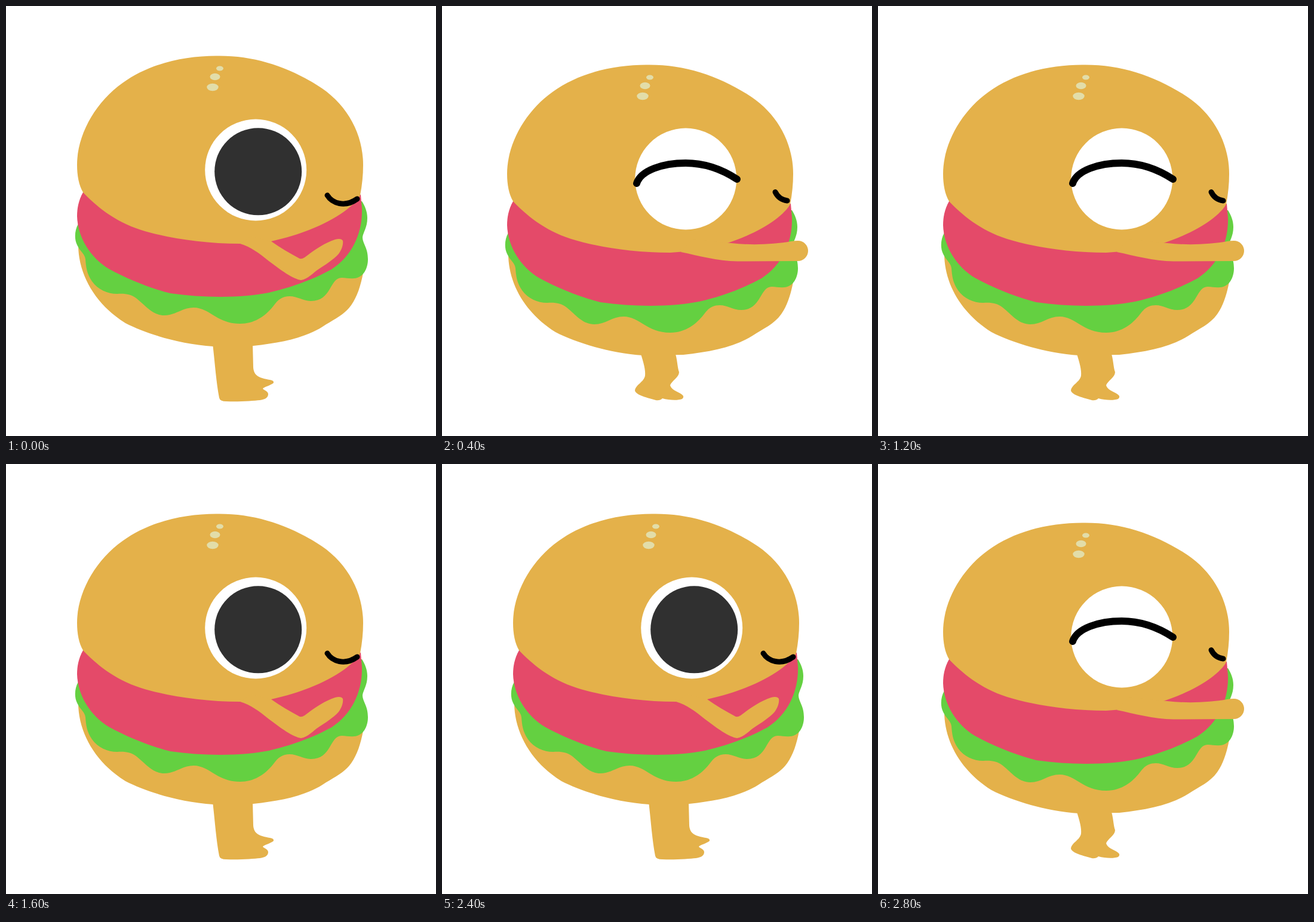
These frames come from a looping animation (720x720 px, 3200 ms). An HTML page:

```html
<!DOCTYPE html>
<html lang="en">
<head>
<meta charset="utf-8">
<title>Hugging burger</title>
<style>
  html, body { margin: 0; width: 100%; height: 100%; overflow: hidden; background: #fff; }
  svg { display: block; width: 100%; height: 100%; }
  .bun { fill: #e4b14a; }
  .lettuce { fill: #64d041; }
  .patty { fill: #e44a69; }
  .seeds { fill: #e2dda9; }
  .line { fill: none; stroke: #000; stroke-width: 9; stroke-linecap: round; }
  .lid { stroke-width: 12; }
</style>
</head>
<body>
<svg viewBox="0 0 720 720">
  <g id="body">
    <path class="bun" d="M121 400C121 450 150 500 200 531C235 549 290 566 347 570L414 569
      C460 564 500 556 530 537C548 525 566 518 578 501C588 487 594 468 598 447L560 400Z"/>
    <path class="lettuce" d="M121 365C115 375 114 390 119 400C124 411 132 415 133 424
      C134 437 135 448 144 461C154 475 170 482 186 482C198 481 209 482 219 490
      C233 501 245 518 265 518C284 518 295 505 314 505C341 505 353 532 392 532
      C419 532 437 516 448 502C456 491 463 486 475 486C488 486 497 494 511 494
      C545 494 542 455 562 455C570 455 575 457 583 456C598 455 606 440 606 424
      C606 404 597 398 597 387C598 379 605 371 605 355C605 344 601 335 596 327L400 340Z"/>
    <path class="patty" d="M129 312C121 326 119 340 119 352C120 388 142 422 172 440
      C205 458 240 472 275 481C330 489 395 489 440 480C475 472 510 460 545 441
      C580 418 597 380 596 340L594 316L400 280Z"/>
    <path class="bun" d="M119 266C119 215 150 161 195 129C240 96 300 83 355 83.5
      C415 83 470 101 520 132C570 162 598 213 598 266Q598 291 593 317
      C580 340 530 375 444 394L392 398C330 398 272 389 226 375C180 360 150 334 129 312
      C122 300 119 284 119 266Z"/>
    <g class="seeds">
      <ellipse cx="358" cy="104.5" rx="6" ry="4"/>
      <ellipse cx="350" cy="118.5" rx="8.5" ry="5.7"/>
      <ellipse cx="346" cy="136" rx="9.7" ry="6.2"/>
    </g>
    <circle cx="418.2" cy="274.5" r="85" fill="#fff"/>
  </g>

  <g id="awake">
    <circle cx="422.2" cy="277.3" r="73" fill="#303030"/>
    <path class="bun" d="M346 565C350 600 352 630 357 656Q358 662 369 662
      C390 663 415 661 425 660C433 659 439 656 439 650C439 645 433 644 430 641
      C431 638 444 635 448 631Q449 627 442 626C425 623 415 620 414 605L413 565Z"/>
    <path class="bun" d="M392 398C410 403 425 415 440 427C460 442 480 457 494 459
      C503 458 510 451 520 443C535 433 548 425 557 415C562 408 565 400 564 393
      Q561 388 551 391C530 398 512 412 500 421Q494 425 490 422
      C475 414 460 405 444 394L410 385Z"/>
    <path class="line" d="M538 317C546 330 567 338 588 323"/>
  </g>

  <g id="hugging">
    <path class="bun" d="M332 580C338 598 341 610 340 619C338 630 324 634 323 644
      C325 652 345 656 358 660Q365 661 369 657C380 660 394 661 402 658
      Q407 654 401 650C394 645 384 643 382 635C384 628 397 622 397 613
      C394 605 394 590 390 580Z"/>
    <path class="bun" d="M400 412C430 418 460 427 495 427.5L596 427A17 17 0 0 0 596 393
      Q590 393 585 394C555 399 520 401 484 397L420 390Z"/>
    <path class="line lid" d="M326 297C333 275 370 263 408 263C440 263 468 273 494 290"/>
    <path class="line" d="M558 311.5Q564 324 578 326"/>
  </g>
</svg>
<script>
  const POSE_MS = 400;
  const [body, awake, hugging] = ["body", "awake", "hugging"].map(id => document.getElementById(id));

  function draw(now) {
    const isHugging = Math.floor(now / POSE_MS) % 2 === 1;
    body.setAttribute("transform", isHugging ? "translate(-10 15)" : "");
    awake.style.display = isHugging ? "none" : "";
    hugging.style.display = isHugging ? "" : "none";
  }

  function tick() {
    draw(performance.now());
    requestAnimationFrame(tick);
  }
  tick();
</script>
</body>
</html>
```
